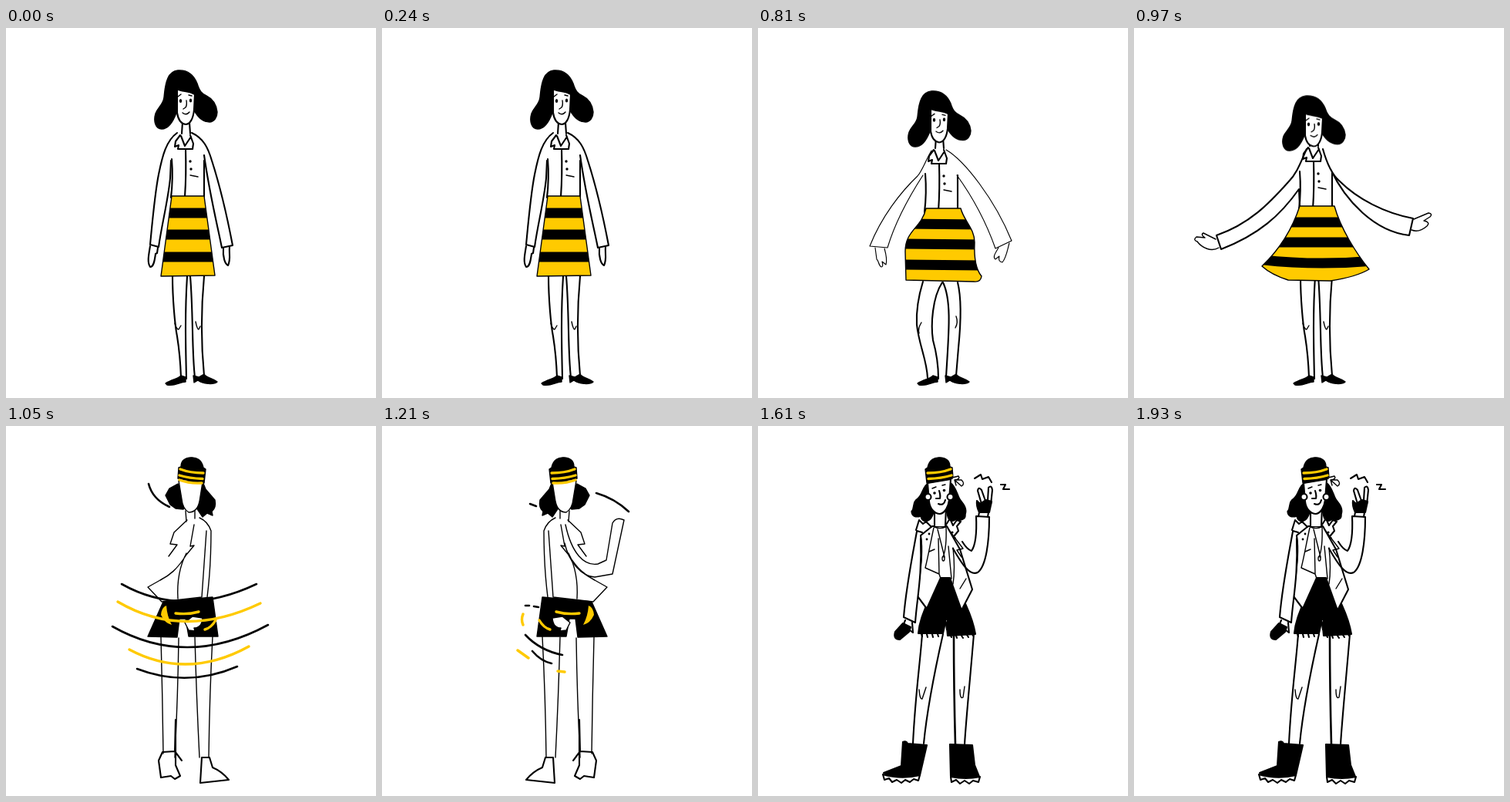
An HTML page without scripts for the animation above (2010 ms loop, 480 by 480 pixels).

```html
<!DOCTYPE html>
<html lang="en">
<head>
<meta charset="utf-8">
<title>Outfit change</title>
<style>
html,body{margin:0;width:100%;height:100%;overflow:hidden;background:#fff}
svg{display:block;width:100vw;height:100vh}
.ink{fill:none;stroke:#000;stroke-width:2.1;stroke-linecap:round;stroke-linejoin:round}
.k{fill:#000}
.w{fill:#fff}
.y{fill:#ffca00}
.gold{stroke:#ffca00;stroke-width:3.4}
.thin{stroke-width:1.4}
.fine{stroke-width:1.15}
.bold{stroke-width:2.6}
.no{stroke:none}
.band{stroke-width:13;stroke-linecap:butt}

/* --t is the start in ms; the animation name sets the length */
.s{opacity:0;animation:d80 2010ms step-end infinite;animation-delay:calc(var(--t)*1ms - 2010.5ms)}
.s90{animation-name:d90}
.s400{animation-name:d400}
.s640{animation-name:d640}
.s720{animation-name:d720}
.s1050{animation-name:d1050}
@keyframes d80{0%{opacity:1}3.98%,100%{opacity:0}}
@keyframes d90{0%{opacity:1}4.477%,100%{opacity:0}}
@keyframes d400{0%{opacity:1}19.9%,100%{opacity:0}}
@keyframes d640{0%{opacity:1}31.84%,100%{opacity:0}}
@keyframes d720{0%{opacity:1}35.82%,100%{opacity:0}}
@keyframes d1050{0%{opacity:1}52.238%,100%{opacity:0}}

.nod{transform-origin:233px 124px;animation:nod 2010ms step-end infinite}
@keyframes nod{
0%,11.94%{transform:none}
7.96%,27.86%{transform:translate(1px,4px) rotate(3.5deg)}
31.84%{transform:translate(2px,10px) rotate(3deg)}
36.318%{transform:translate(2px,17px) scale(1,.97) rotate(1deg)}
40.298%{transform:translate(2px,23.4px) scale(1,.95)}
44.278%{transform:translate(1px,29px) scale(1,.94)}
48.258%,100%{transform:translate(0,28.6px) scale(1,.935)}
}
.dip{animation:dip 2010ms step-end infinite}
@keyframes dip{
0%{transform:none}
31.84%{transform:translate(0,6px)}
36.318%{transform:translate(1px,13px)}
40.298%{transform:translate(2px,19px)}
44.278%{transform:translate(1px,18px)}
48.258%,100%{transform:translate(0,16px)}
}
</style>
</head>
<body>
<svg viewBox="0 0 480 480" xmlns="http://www.w3.org/2000/svg">
<defs>
<!-- office look -->
<path id="sk1" d="M215 218L257 218L271 321L201 322Z"/>
<path id="sk2" d="M218 234L263 234C267 250 281 260 281 278C280 300 284 315 290 322Q289 330 280 329L192 327L191 290C191 262 212 260 218 234Z"/>
<path id="sk3" d="M215 231L260 231C268 260 288 292 305 313Q288 323 255 328L200 327Q178 320 166 309C188 288 205 262 215 231Z"/>
<clipPath id="c1"><use href="#sk1"/></clipPath>
<clipPath id="c2"><use href="#sk2"/></clipPath>
<clipPath id="c3"><use href="#sk3"/></clipPath>
<g id="skirt1">
  <use href="#sk1" class="y no"/>
  <path class="band" clip-path="url(#c1)" d="M190 240L280 240M190 268L280 268M190 297L280 297"/>
  <use href="#sk1" class="thin"/>
</g>
<g id="skirt2">
  <use href="#sk2" class="y no"/>
  <path class="band" clip-path="url(#c2)" d="M180 254L300 255M180 280L300 281M180 307L300 308"/>
  <use href="#sk2" class="thin"/>
</g>
<g id="skirt3">
  <use href="#sk3" class="y no"/>
  <path class="band" clip-path="url(#c3)" d="M160 252L310 252M160 278L310 278M160 300Q235 309 310 302"/>
  <use href="#sk3" class="thin"/>
</g>
<g id="shoes" class="k thin">
  <path d="M207 461C215 456 224 455 227 451L233 453L233 459C225 459 220 465 209 463Z"/>
  <path d="M243 451L244 460L249 457C255 462 270 463 274 459C268 454 260 454 257 449L250 453Z"/>
</g>
<g id="legs1">
  <path d="M216 322C216 350 219 385 222 400Q226 425 227 453M235 322C232 370 233 410 234 455M239 322C243 370 241 420 245 453M257 322C253 365 253 410 257 451"/>
  <path class="thin" d="M219 383Q221 391 224 391L227 386M246 381Q248 391 250 391L252 387"/>
  <use href="#shoes"/>
</g>
<g id="legs2">
  <path d="M214 329C210 342 205 365 206 385C209 412 219 430 220 454M239 330C226 350 224 385 227 405Q234 430 234 455M240 330C252 355 247 400 244 453M259 330C264 350 263 385 260 415L257 451"/>
  <path class="thin" d="M212 382Q207 390 209 396M257 374Q260 382 256 389"/>
  <use href="#shoes"/>
</g>
<g id="armL1">
  <path d="M222 136C208 146 203 165 198 190C193 215 190 250 187 281L198 284C202 255 210 225 213 195L214 172"/>
  <path d="M187 283C185 295 183 304 187 310C192 310 193 300 194 293L196 292L197 285"/>
</g>
<g id="armR1">
  <path d="M241 136C256 143 262 155 267 172C276 200 286 240 294 282L280 285C274 255 264 215 257 165"/>
  <path d="M282 286C281 297 284 306 288 308C292 300 289 292 290 284"/>
</g>
<g id="armL2" class="fine">
  <path d="M225 159C216 175 213 185 207 192C185 213 160 245 145 283L168 285C177 255 192 225 214 191"/>
  <path d="M152 285L154 300C157 302 156 308 160 310Q163 310 161 303L166 307Q168 300 164 286"/>
</g>
<g id="armR2" class="fine">
  <path d="M244 158C268 172 307 222 329 276L308 286C297 255 279 220 258 191"/>
  <path d="M312 285C308 292 304 297 308 300L313 296Q311 303 317 304C322 298 323 290 326 279"/>
</g>
<g id="arms3">
  <path d="M224 157C217 172 212 188 200 200C175 228 150 254 107 269L113 287C162 268 190 243 214 209L215 231M245 157C250 175 257 190 266 198C290 222 325 240 362 247L357 269C312 264 274 224 255 183"/>
  <path class="thin" d="M106 274L90 266Q86 268 92 272L81 271Q76 275 82 277C88 285 100 291 110 285M363 248L382 240Q388 241 384 245L376 250Q385 252 380 257C372 264 365 264 360 262"/>
</g>
<g id="torso">
  <path d="M229 122L228 137M238 123L239 137M215 170Q217 195 214 220M257 172L257 220"/>
  <path d="M226 139L220 147L219 154L224 152L223 157L242 157L243 150L239 139M227 140L232 153L240 141"/>
  <path d="M233 157Q234 190 232 219"/>
  <path class="thin" d="M239 191L249 193"/>
  <g class="k no"><circle cx="239" cy="173" r="1.7"/><circle cx="240" cy="183" r="1.7"/></g>
</g>
<g id="head">
  <path class="k thin" d="M223 55C236 54 244 62 248 72C251 82 254 85 260 88C268 92 273 100 274 109C274 116 270 122 264 122C255 122 249 116 244 107L221 110C217 121 211 131 202 131C194 131 191 121 194 111C197 103 204 99 205 90C206 82 206 74 210 65Q214 56 223 55Z"/>
  <path class="w" d="M222 79C229 83 236 81 245 86L244 106C243 117 239 125 233 125C226 124 223 117 222 110Z"/>
  <path class="thin" d="M234 94Q235 100 233 103L230 105M229 110Q234 114 238 109M223 89L227 86M237 87L241 88"/>
  <g class="k no"><ellipse cx="226.500" cy="94.500" rx="1.700" ry="2.500"/><ellipse cx="239.500" cy="94" rx="1.700" ry="2.500"/></g>
</g>

<!-- whirl -->
<g id="cap">
  <path class="k thin" d="M220 54C222 44 229 40 237 41C246 42 249 47 249 53L252 54L253 68L219 74L217 56Z"/>
  <path class="gold" d="M220 61Q237 61 250 56M221 68.500Q238 68 251 64"/>
</g>
<g id="sketch" class="thin">
  <path class="k" d="M221 72L217 82L205 96Q203 106 209 111L208 116L215 113L221 118L233 100L253 75L264 81L269 90L263 102L256 107L246 108Z"/>
  <path class="w" d="M221 73L225 98Q228 112 239 112Q247 107 248 95L252 71Z"/>
  <use href="#cap"/>
  <path class="gold" d="M222 74Q238 75 251 70"/>
  <path d="M231 110L231 120M243 110L242 124M225 119Q214 124 210 136C210 175 213 215 219 248M216 136L222 222M241 122L258 138L263 153L254 154L265 169M232 128L237 156L232 155L242 167C254 186 264 194 276 200M242 165Q255 190 253 224M276 200L292 209L274 228L222 222"/>
  <path class="k" d="M208 222L272 228L292 273L254 274L251 250L243 250L239 273L201 273Z"/>
  <path class="gold" d="M226 241Q240 245 256 243M204 252Q210 262 218 264"/>
  <path class="y no" d="M268 233Q274 235 275 245Q270 256 261 258Q267 247 268 233Z"/>
  <path class="w" d="M221 249Q222 262 232 262L231 266L239 265L244 255L234 247Z"/>
  <path d="M208 273Q212 350 213 430M231 274Q229 350 225 430M252 275Q253 350 257 430M275 274Q273 350 272 425"/>
  <path class="ink" d="M212 430L222 430L224 463L187 459Q196 448 208 443ZM256 381L257 422L273 423L278 434L275 456L262 454L257 458L250 454L256 440ZM257 422L248 434"/>
</g>
<path id="bent" class="thin" d="M238 128C246 165 262 182 280 179L291 174L299 126Q304 117 314 122L299 192L276 196C258 195 242 175 237 152"/>

<!-- street look -->
<g id="street">
  <path d="M213 270C210 310 204 350 201 412M240 270C231 310 220 360 215 412M280 270C275 330 270 380 268 413"/>
  <path class="bold" d="M254 272Q254 340 256 413"/>
  <path class="thin" d="M209 342Q210 355 213 354L218 339M262 342Q262 355 266 352L268 338"/>
  <path class="k" d="M188 410Q192 408 194 412L219 414L210 453C195 458 172 456 163 450L186 441Z"/>
  <path class="k" d="M249 413L278 414L281 440L287 455Q268 458 250 454Z"/>
  <path class="w" d="M162 452L164 459L170 457L174 462L180 459L186 463L191 459L197 462L202 458L208 460L210 453Q186 459 162 452ZM250 455L251 462L257 459L262 464L268 460L274 464L279 460L286 462L288 455Q270 459 250 455Z"/>
  <path class="k" d="M231 198L252 199C262 215 278 245 282 270L246 272L244 250L240 269L208 269C210 245 224 225 231 198Z"/>
  <path d="M212 270l1 3M219 270l1 4M226 270l1 4M233 270l1 3M250 272l1 2M257 272l1 3M264 272l2 3M271 271l2 3M278 270l1 2"/>
  <path class="w" d="M246 251L245 264L243 251ZM211 142C215 170 208 200 207 221L219 237L237 197L249 197L264 239L278 212L262 160L245 130L226 130Z"/>
  <path class="thin" d="M211 142C215 170 208 200 207 221M228 132C224 150 221 168 217 184L235 192L234 146M222 163L229 160M235 192L237 198L251 198L247 156M247 134L266 159L258 161L264 170M262 211L270 198M253 158Q256 185 253 205M233 134L242 170M244 131Q245 158 240 170M229 131Q236 134 243 131"/>
  <ellipse class="thin" cx="240.500" cy="172" rx="1.500" ry="3"/>
  <path d="M205 135L209 122L214 127L218 124L225 131M206 136L213 138M244 128L249 120L253 129L258 122L263 124L258 130L260 136L255 142"/>
  <g class="k no"><circle cx="222" cy="140" r="1.400"/><circle cx="219" cy="147" r="1.400"/><circle cx="252" cy="138" r="1.600"/><circle cx="255" cy="145" r="1.600"/></g>
  <path class="k thin" d="M222 73C212 79 215 87 207 94C199 99 204 106 199 111C200 120 208 118 211 117C213 127 224 126 228 112L245 112C246 126 254 124 257 121C262 124 270 121 269 115C272 106 265 99 262 95C258 88 257 78 249 73Z"/>
  <path class="w no" d="M229.500 108L243.500 106L243 130L229.500 130Z"/>
  <path d="M229 108L229 130M244 104L243 130"/>
  <path class="w" d="M220 74L222 98C223 108 230 114 236 114C243 113 247 104 248 96L250 69Z"/>
  <circle class="w" cx="220.500" cy="92" r="4"/><circle class="w" cx="249.500" cy="92" r="4"/>
  <use href="#cap"/>
  <path class="w thin" d="M252 67L260 65Q263 69 255 70L264 78Q269 75 264 70L255 70L257 77"/>
</g>
<g id="face">
  <path d="M235 84Q237 90 236 94L231 94M234 101Q241 104 243 96"/>
  <path class="thin" d="M226 81L231 79M239 77L243 76"/>
  <g class="k no"><circle cx="229" cy="87" r="1.800"/><circle cx="241.500" cy="83.500" r="1.800"/></g>
</g>
<path id="sleeve" d="M283 117L300 118C300 150 296 182 285 190C275 195 265 180 253 159M283 117C284 140 282 155 277 162Q271 160 265 150"/>
<g id="wave">
  <path class="w" d="M290 101L285 84Q286 78 290 83L295 97L298 97L299 80Q303 76 304 83L302 102"/>
  <path class="k" d="M284 97L288 101L296 96L303 98L300 112L287 112Q283 104 284 97Z"/>
  <path d="M287 112L286 117M299 112L298 118"/>
</g>
<g id="low1">
  <path class="w" d="M206 137C198 170 196 210 194 249L209 253C209 230 213 200 211 146"/>
  <path class="k" d="M196 257L208 255L208 264C206 275 203 281 199 279C193 276 195 265 196 257Z"/>
</g>
<g id="low2">
  <path class="w" d="M206 137C200 170 192 210 189 248L204 255C206 225 213 195 211 146"/>
  <path class="k" d="M188 256L198 261L196 267L184 277Q175 277 178 267Z"/>
  <path d="M191 252L189 257M200 255L201 268L197 265"/>
</g>
<path id="zigA" d="M271 67L277 60L276 66L285 57M290 72L300 67L302 74L306 67L313 75"/>
<path id="zigB" d="M281 68L289 63L291 69L299 66L303 73M315 76L321 76L318 82L326 82"/>
<path id="zigC" d="M283 65L290 68L293 60L302 65M312 71L318 66L319 75L326 71"/>
</defs>

<g class="ink">
  <g class="s s1050" style="--t:0">
    <g class="dip"><use href="#torso"/></g>
    <g class="nod"><use href="#head"/></g>
  </g>

  <g class="s s640" style="--t:0">
    <use href="#legs1"/><use href="#armL1"/><use href="#armR1"/><use href="#skirt1"/>
  </g>
  <g class="s s90" style="--t:640">
    <use href="#legs1"/>
    <use href="#armL1" transform="translate(0 6) rotate(5 222 136)"/>
    <use href="#armR1" transform="translate(0 6) rotate(-5 241 136)"/>
    <use href="#skirt1" transform="translate(0 5)"/>
  </g>
  <g class="s" style="--t:730">
    <use href="#legs2"/>
    <use href="#armL2" transform="translate(-1 -5) rotate(-10 222 160)"/>
    <use href="#armR2" transform="translate(-1 -5) rotate(10 247 158)"/>
    <use href="#skirt2" transform="translate(-1 -4)"/>
  </g>
  <g class="s" style="--t:810">
    <use href="#legs2"/><use href="#armL2"/><use href="#armR2"/><use href="#skirt2"/>
  </g>
  <g class="s" style="--t:890">
    <use href="#legs1"/>
    <use href="#armL2" transform="rotate(18 222 160)"/>
    <use href="#armR2" transform="rotate(-18 247 158)"/>
    <use href="#skirt3" transform="translate(35 2) scale(.85 1)"/>
  </g>
  <g class="s" style="--t:970">
    <use href="#legs1"/><use href="#arms3"/><use href="#skirt3"/>
  </g>

  <g class="s" style="--t:1050">
    <use href="#sketch" transform="translate(476) scale(-1 1)"/>
    <path class="bold" d="M150 205Q230 250 325 205M138 260Q235 315 340 258M170 315Q235 340 300 312M185 75Q190 95 212 105"/>
    <path class="gold" d="M145 228Q230 278 330 230M160 290Q235 330 315 286"/>
  </g>
  <g class="s" style="--t:1130">
    <use href="#sketch"/>
    <use href="#bent" transform="rotate(24 240 130)"/>
    <path class="bold" d="M160 225Q195 262 240 270M150 262Q190 300 250 302M262 68Q310 80 335 118"/>
    <path class="gold" d="M158 245Q190 284 238 288M175 302Q205 320 240 322M290 235Q312 228 322 214"/>
  </g>
  <g class="s" style="--t:1210">
    <use href="#sketch"/><use href="#bent"/>
    <path class="bold" d="M186 271C199 285 214 293 234 297M195 292Q206 305 220 308M278 87Q302 94 320 111M192 101L200 104M186 233L191 233M197 234L203 235"/>
    <path class="gold" d="M176 291L190 301M183 244Q180 251 183 258M228 318L237 319"/>
  </g>

  <g class="s s720" style="--t:1290">
    <use href="#street"/><use href="#sleeve"/>
  </g>
  <g class="s" style="--t:1290">
    <use href="#low1"/><use href="#face"/>
    <use href="#wave" transform="translate(-4 1) rotate(-4 292 117)"/>
    <path class="bold" d="M306 84Q316 92 320 104M182 250Q184 264 190 272"/>
  </g>
  <g class="s" style="--t:1370">
    <use href="#low1"/><use href="#face"/>
    <use href="#wave" transform="rotate(-16 292 117)"/>
    <use href="#zigA"/>
  </g>
  <g class="s" style="--t:1450">
    <use href="#low1" transform="rotate(2 206 137)"/><use href="#face"/>
    <use href="#wave"/>
    <use href="#zigB"/>
  </g>
  <g class="s" style="--t:1530">
    <use href="#low2"/><use href="#face"/>
    <use href="#wave" transform="rotate(-14 292 117)"/>
    <use href="#zigA"/>
  </g>
  <g class="s s400" style="--t:1610">
    <use href="#low2"/><use href="#face"/><use href="#wave"/>
  </g>
  <g class="s" style="--t:1610"><use href="#zigB"/></g>
  <g class="s" style="--t:1690"><use href="#zigC"/></g>
  <g class="s" style="--t:1770"><use href="#zigB"/></g>
  <g class="s" style="--t:1850"><use href="#zigC"/></g>
  <g class="s" style="--t:1930"><use href="#zigB"/></g>
</g>
</svg>
</body>
</html>
```
